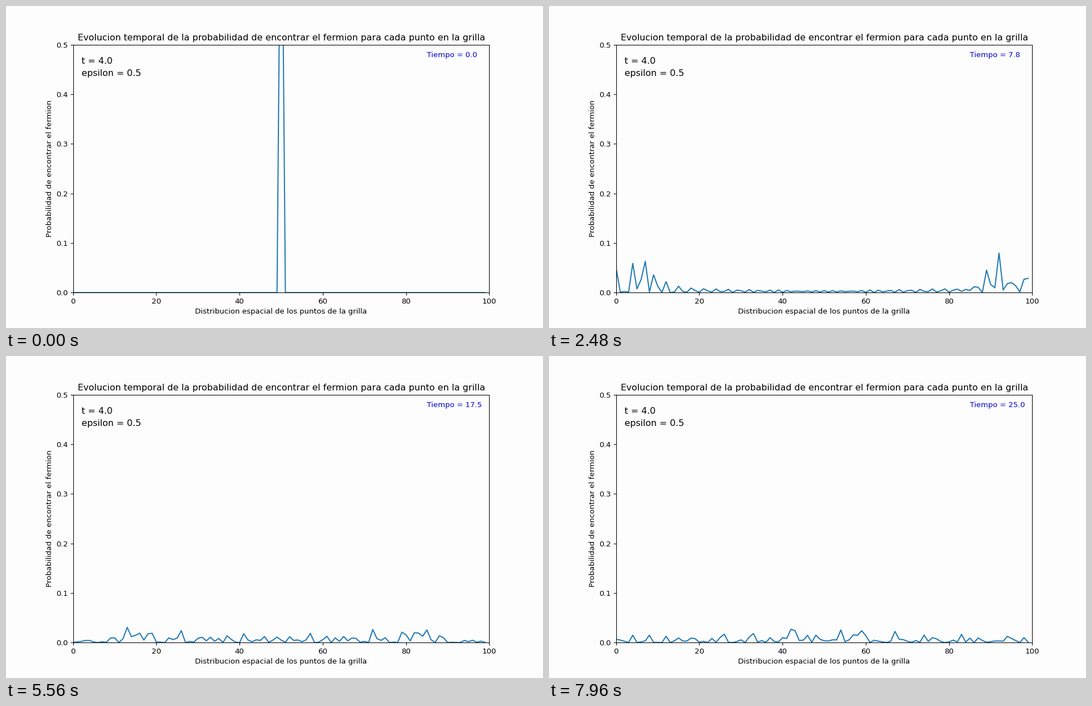
A matplotlib script that plays this animation: 966 by 580 pixels, repeating every 8 s.

```python
import numpy as np
import matplotlib.pyplot as plt
from matplotlib.animation import FuncAnimation

SITES, FRAMES = 100, 200
HOP, EPS = 4.0, 0.5
DPI = 96.6
BACK = "#fdfdfd"

times = np.linspace(0, 25, FRAMES)
dt = times[1] - times[0]

# Tight-binding chain with open ends
H = EPS * np.eye(SITES) + HOP * (np.eye(SITES, k=1) + np.eye(SITES, k=-1))


def slope(psi):
    return -1j * (H @ psi)


def rk4(psi):
    k1 = slope(psi)
    k2 = slope(psi + dt / 2 * k1)
    k3 = slope(psi + dt / 2 * k2)
    k4 = slope(psi + dt * k3)
    return psi + dt / 6 * (k1 + 2 * k2 + 2 * k3 + k4)


def evolve():
    psi = np.zeros(SITES, complex)
    psi[SITES // 2] = 1
    # The start state is held for one extra step
    probs = [np.abs(psi) ** 2]
    for _ in range(FRAMES - 1):
        probs.append(np.abs(psi) ** 2)
        psi = rk4(psi)
    return probs


probs = evolve()

plt.rcParams["font.family"] = "DejaVu Sans"
fig, ax = plt.subplots(figsize=(966 / DPI, 580 / DPI), dpi=DPI, facecolor=BACK)
ax.set_facecolor(BACK)
ax.set(xlim=(0, 100), ylim=(0, 0.5),
       xlabel="Distribucion espacial de los puntos de la grilla",
       ylabel="Probabilidad de encontrar el fermion")
ax.set_title("Evolucion temporal de la probabilidad de encontrar "
             "el fermion para cada punto en la grilla")
ax.text(2, 0.4615, f"t = {HOP}", fontsize=12)
ax.text(2, 0.4365, f"epsilon = {EPS}", fontsize=12)
clock = ax.text(85, 0.475, "", color="mediumblue")
line, = ax.plot(np.arange(SITES), probs[0], lw=1.5, color="C0")


def update(i):
    line.set_ydata(probs[i])
    clock.set_text(f"Tiempo = {times[i]:.1f}")
    return line, clock


anim = FuncAnimation(fig, update, frames=FRAMES, interval=40,
                     repeat=True, repeat_delay=0)
plt.show()
```
